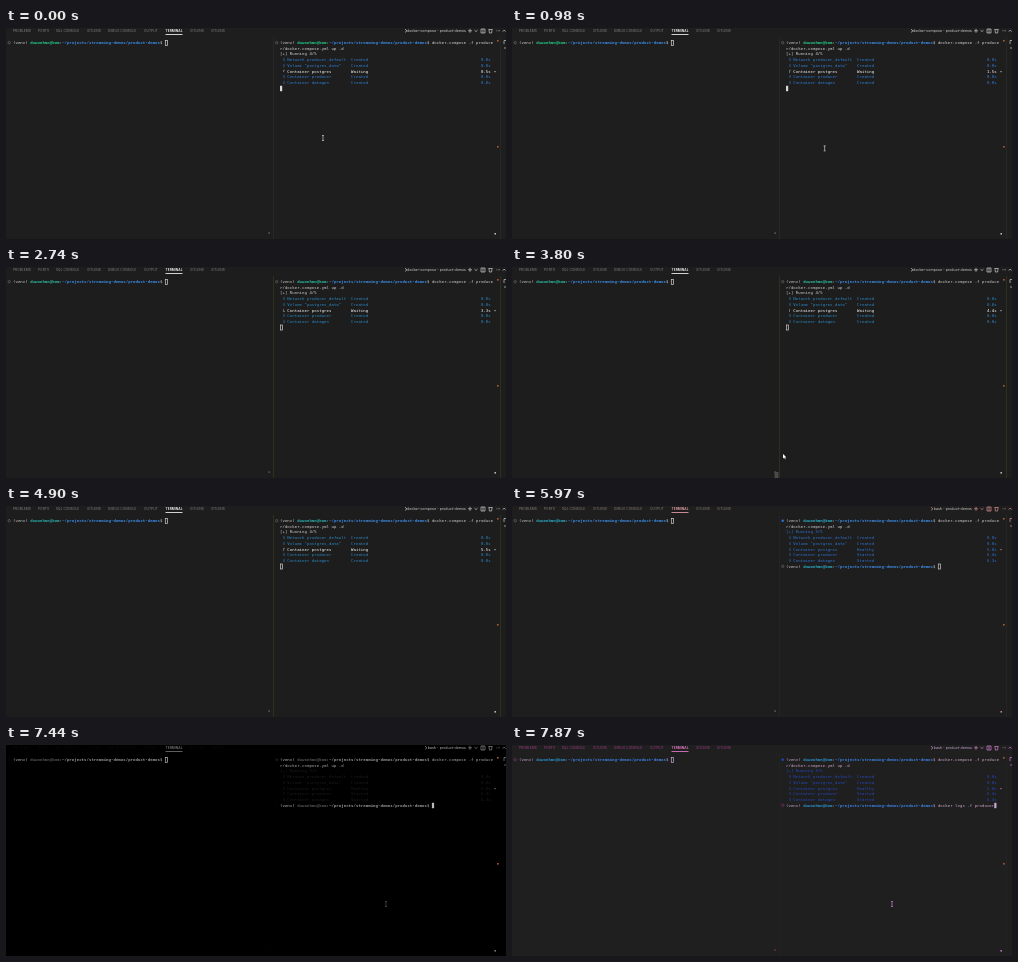
Recreate the animation shown at these times as an HTML page with a canvas. Size 500x211 px, loop 8000 ms.

```html
<!DOCTYPE html>
<html lang="en">
<head>
<meta charset="utf-8">
<title>Terminal</title>
<style>
html, body { margin: 0; width: 100%; height: 100%; overflow: hidden; background: #1e1e1e; }
canvas { display: block; }
</style>
</head>
<body>
<canvas id="stage" width="500" height="211"></canvas>
<script>
const ctx = document.getElementById('stage').getContext('2d');
const LOOP = 8000, CHAR = 2.45, LINE = 5.7, TOP = 15, LEFT = 7, RIGHT = 274;
const MONO = '"DejaVu Sans Mono", monospace', SANS = 'Inter, sans-serif';
const DONE = 5970, HEALTHY = 5250;

// The colour set switches hard at each start time.
const palette = (start, bg, text, user, path, info, tab, active, cmd, icon, line) =>
  ({ start, bg, text, user, path, info, tab, active, cmd, icon, line });
const palettes = [
  palette(0, '#1e1e1e', '#d8d8d8', '#23d18b', '#3b8eea', '#2f7fd6', '#858585', '#fff', '#d8d8d8', '#ccc', '#2a2a2a'),
  palette(1680, '#1f1f1f', '#7a78e8', '#8a4fc8', '#3568f0', '#2230b4', '#6a3c9c', '#8f8cff', '#e06070', '#5560e8', '#242424'),
  palette(1810, '#1d1d1d', '#d0d0d0', '#2cc0a4', '#3b8eea', '#2b8ac4', '#808080', '#fff', '#d0d0d0', '#ccc', '#32361f'),
  palette(4080, '#1d1d1d', '#d0d0d0', '#2cb4b4', '#3b8eea', '#2b8ac4', '#808080', '#fff', '#d0d0d0', '#ccc', '#32361f'),
  palette(DONE, '#1e1e1e', '#d0d0d0', '#2cb0cc', '#3b8eea', '#2f74d0', '#8c7c7c', '#f0a8b0', '#d0d0d0', '#d89090', '#262626'),
  palette(7440, '#000', '#bbb', '#555', '#999', '#1c1c1c', '#0c0c0c', '#777', '#aaa', '#888', '#000'),
  palette(7870, '#1f1f1f', '#c8a8d8', '#2c94d0', '#3c84e8', '#2448bc', '#9c3c88', '#f080d0', '#d0a8c8', '#d080d0', '#242424')
];

const tabs = [['PROBLEMS', 7], ['PORTS', 32], ['SQL CONSOLE', 50], ['GITLENS', 81], ['DEBUG CONSOLE', 102],
  ['OUTPUT', 138], ['TERMINAL', 159.5], ['GITLENS', 184], ['GITLENS', 205]];

// Text is laid out large and scaled down evenly, so advances stay fractional.
function write(str, x, y, color, { size = 4.07, font = MONO, weight = 400, align = 'left' } = {}) {
  ctx.save();
  ctx.translate(x, y);
  ctx.scale(0.02, 0.02);
  ctx.font = `${weight} ${size * 50}px ${font}`;
  ctx.textAlign = align;
  ctx.textBaseline = 'middle';
  ctx.fillStyle = color;
  ctx.fillText(str, 0, 0);
  ctx.restore();
}

function rect(x, y, w, h, color) {
  ctx.fillStyle = color;
  ctx.fillRect(x, y, w, h);
}

function stroke(color, ...lines) {
  ctx.strokeStyle = color;
  ctx.lineWidth = 0.7;
  ctx.beginPath();
  for (const line of lines) line.forEach(([x, y], i) => i ? ctx.lineTo(x, y) : ctx.moveTo(x, y));
  ctx.stroke();
}

function ring(x, y, color, filled) {
  ctx.beginPath();
  ctx.arc(x, y, 1.2, 0, 7);
  ctx.fillStyle = ctx.strokeStyle = color;
  ctx.lineWidth = 0.5;
  filled ? ctx.fill() : ctx.stroke();
}

const row = i => TOP + LINE * i;

function prompt(x, y, p) {
  const part = (str, col, color, weight) => write(str, x + col * CHAR, y, color, { weight });
  part('(venv)', 0, p.text);
  part('duwonhan@bom', 7, p.user, 700);
  part(':', 19, p.text);
  part('~/projects/streaming-demos/product-demos', 20, p.path, 700);
  part('$', 60, p.text);
  return x + 62 * CHAR;
}

function cursor(x, y, color, solid) {
  if (solid) return rect(x, y - 2.8, 2.2, 5.4, color);
  ctx.strokeStyle = color;
  ctx.lineWidth = 0.7;
  ctx.strokeRect(x + 0.4, y - 2.6, 2.2, 5);
}

function header(p, done) {
  for (const [name, x] of tabs) {
    const active = name === 'TERMINAL';
    write(name, x, 2.8, active ? p.active : p.tab, { size: 3.3, font: SANS, weight: active ? 600 : 400 });
  }
  rect(159.5, 6, 17, 0.8, p.active);
  const title = (done ? 'bash' : 'docker-compose') + ' - product-demos';
  write(title, 460, 2.8, p.text, { size: 3.6, font: SANS, align: 'right' });
  const x = done ? 419 : 399;
  stroke(p.icon,
    [[x, 1.2], [x + 2, 2.8], [x, 4.4]],
    [[462, 2.8], [466, 2.8]], [[464, 0.8], [464, 4.8]],
    [[468.5, 2.2], [470, 3.6], [471.5, 2.2]],
    [[475, 1], [479, 1], [479, 5], [475, 5], [475, 1]], [[477, 1], [477, 5]],
    [[482.5, 1.5], [486.5, 1.5]], [[483, 1.5], [483.4, 5], [485.6, 5], [486, 1.5]],
    [[496.8, 3.6], [498.2, 2], [499.6, 3.6]]);
  for (let i = 0; i < 3; i++) rect(490.5 + i * 1.4, 2.5, 0.7, 0.7, p.icon);
}

function edges(p) {
  rect(267, 9, 0.8, 202, p.line);
  rect(494, 9, 0.8, 202, p.line);
  rect(491, 12, 1.6, 1.6, '#b05a34');
  rect(491, 118, 1.6, 1.6, '#b05a34');
  rect(488.5, 43, 1, 1.2, p.icon);
  rect(262.5, 204.5, 1.2, 1.2, p.tab);
  rect(488.5, 205, 1.4, 1.6, p.icon);
  stroke(p.icon, [[498, 16], [498, 12.5], [500, 12.5]], [[498, 20], [500, 20]]);
}

function services(t, p) {
  const clock = (0.5 + t * 0.00102).toFixed(1) + 's';
  const healthy = t >= HEALTHY, done = t >= DONE;
  const start = final => done ? ['Started', final] : healthy ? ['Starting', clock, true] : ['Created', '0.0s'];
  const rows = [
    ['Network producer_default', 'Created', '0.0s'],
    ['Volume "postgres_data"', 'Created', '0.0s'],
    ['Container postgres', ...(healthy ? ['Healthy', '5.8s'] : ['Waiting', clock, true])],
    ['Container producer', ...start('6.4s')],
    ['Container datagen', ...start('6.3s')]
  ];
  write(`[+] Running ${done ? 5 : healthy ? 3 : 4}/5`, RIGHT, row(2), done ? p.info : p.text);
  rows.forEach(([name, status, time, busy], i) => {
    const y = row(i + 3), color = busy ? '#fff' : p.info;
    const spin = busy ? '⠋⠙⠹⠸⠼⠴⠦⠧⠇⠏'[Math.floor(t / 100) % 10] : '⠿';
    [[spin, 1], [name, 3], [status, 29], [time, 82]].forEach(([str, col]) =>
      write(str, RIGHT + col * CHAR, y, color));
  });
}

function beam(x, y, color) {
  stroke(color, [[x - 1, y - 2.5], [x + 1, y - 2.5]], [[x, y - 2.5], [x, y + 2.5]], [[x - 1, y + 2.5], [x + 1, y + 2.5]]);
}

function arrow(x, y) {
  ctx.beginPath();
  [[0, 0], [0, 4.6], [1.2, 3.6], [2, 5.2], [2.7, 4.8], [2, 3.3], [3.3, 3.3]].forEach(([dx, dy]) => ctx.lineTo(x + dx, y + dy));
  ctx.fillStyle = '#fff';
  ctx.fill();
}

const ease = (t, from, to) => {
  const k = Math.min(1, Math.max(0, (t - from) / (to - from)));
  return k * k * (3 - 2 * k);
};

function mouse(t, p) {
  if (t < 1540) {
    const k = ease(t, 850, 1540);
    beam(317 - 46 * k, 110 + 110 * k, p.icon);
  } else if (t >= 3670 && t < 3930) {
    arrow(271, t < 3800 ? 202 : 187);
    rect(262.5, 205, 4, 6, '#4a4a4a');
  } else if (t >= 7150) {
    beam(380, 215 - 56 * ease(t, 7100, 7440), p.bg === '#000' ? '#555' : p.icon);
  }
}

function draw(t) {
  const p = palettes.findLast(set => set.start <= t), done = t >= DONE;
  rect(0, 0, 500, 211, p.bg);
  header(p, done);
  edges(p);

  cursor(prompt(LEFT, TOP, p), TOP, p.text, false);
  ring(3.2, TOP - 0.3, p.tab, false);

  write('docker-compose -f produce', prompt(RIGHT, TOP, p), TOP, p.cmd);
  write('r/docker-compose.yml up -d', RIGHT, row(1), p.cmd);
  ring(270.7, TOP - 0.3, done ? p.info : p.tab, done);
  services(t, p);

  if (done) {
    const y = row(8), end = prompt(RIGHT, y, p), command = t >= 7870 ? 'docker logs -f producer' : '';
    ring(270.7, y - 0.3, p.tab, false);
    write(command, end, y, p.cmd);
    cursor(end + command.length * CHAR, y, p.text, t >= 7440);
  } else {
    cursor(RIGHT, row(8), p.text, t < 1540);
  }
  mouse(t, p);
}

function frame(now) {
  draw(now % LOOP);
  requestAnimationFrame(frame);
}
requestAnimationFrame(frame);
</script>
</body>
</html>
```
